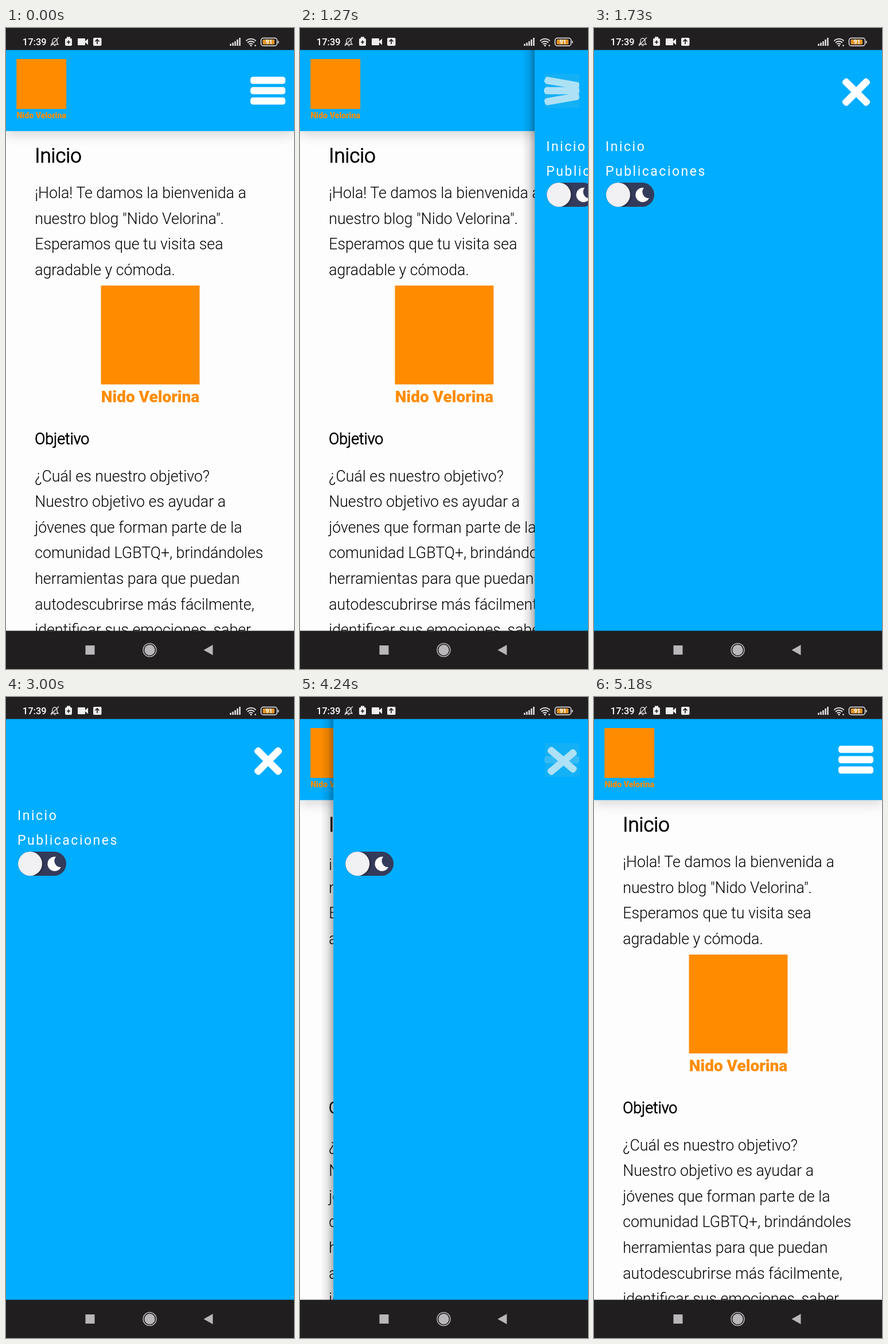
These frames come from a looping animation (502 px wide and 1115 px high, 5.24 s). An HTML page:

```html
<!DOCTYPE html>
<html lang="es">
<head>
<meta charset="utf-8">
<title>Menú móvil</title>
<style>
  html, body { margin: 0; height: 100%; overflow: hidden; background: #fefdfe; }
  svg { display: block; width: 100vw; height: 100vh; font-family: Roboto, sans-serif; }
  #copy text { font-size: 26.74px; font-weight: 300; }
  #copy .title { stroke: #000; stroke-width: .034em; }
  #links { font-size: 23px; letter-spacing: 2.5px; fill: #fff; }
</style>
</head>
<body>
<svg viewBox="0 0 502 1115">
  <defs>
    <linearGradient id="beside" x1="1" x2="0">
      <stop stop-opacity=".3"/><stop offset=".45" stop-opacity=".1"/><stop offset="1" stop-opacity="0"/>
    </linearGradient>
    <filter id="soft" x="-30%" y="-30%" width="160%" height="160%"><feGaussianBlur stdDeviation="2"/></filter>
    <filter id="wide" x="-10%" y="-30%" width="120%" height="160%"><feGaussianBlur stdDeviation="10"/></filter>
    <clipPath id="pill"><rect x="21" y="269" width="84" height="42" rx="21"/></clipPath>
    <g id="logo" fill="#ff8c00">
      <rect x="2.5" width="172" height="172"/>
      <text x="88.5" y="203" font-size="28" font-weight="900" text-anchor="middle">Nido Velorina</text>
    </g>
  </defs>

  <rect width="502" height="1115" fill="#fefdfe"/>
  <g id="copy">
    <text class="title" x="50.2" y="234" style="font-size:34.8px">Inicio</text>
    <text class="title" x="50.2" y="724">Objetivo</text>
  </g>
  <use href="#logo" transform="translate(163 448)"/>

  <rect y="46" width="502" height="141" opacity=".14" filter="url(#wide)"/>
  <rect y="38" width="502" height="141.300" fill="#00adff"/>
  <use href="#logo" transform="translate(17 54) scale(.505)"/>

  <g id="panel">
    <rect x="-22" y="38" width="22" height="1011" fill="url(#beside)"/>
    <rect y="38" width="530" height="1011" fill="#00adff"/>
    <g id="links">
      <text x="20" y="213.5">Inicio</text>
      <text x="20" y="256.5">Publicaciones</text>
    </g>
    <rect x="21" y="269" width="84" height="42" rx="21" fill="#343b5b"/>
    <circle cx="43" cy="291" r="21" opacity=".5" filter="url(#soft)" clip-path="url(#pill)"/>
    <circle cx="42" cy="290" r="21" fill="#f1f0f2"/>
    <path d="M87 278A12.5 12.5 0 1 0 96 296A11 11 0 0 1 87 278Z" fill="#fff"/>
  </g>

  <g id="bars" fill="#fff">
    <rect x="-30.5" y="-6.2" width="61" height="12.4" rx="4.5"/>
    <rect x="-30.5" y="-6.2" width="61" height="12.4" rx="4.5" transform="translate(456.5 109)"/>
    <rect x="-30.5" y="-6.2" width="61" height="12.4" rx="4.5"/>
  </g>
  <rect id="tap" x="427" y="80" width="60" height="59" fill="#33b5e5"/>

  <rect width="502" height="38.300" fill="#221f21"/>
  <text x="28.8" y="30" font-size="16.5" font-weight="500" fill="#fff">17:39</text>
  <g fill="#eee">
    <path d="M79 28.500H91L89 25.500V22A4 4 0 0 0 81 22V25.500ZM83.500 30.500H86.500M78 31L92 16.500" fill="none" stroke="#ddd" stroke-width="1.4"/>
    <path d="M106 15.500H112V18H106Z"/>
    <rect x="103" y="18" width="12" height="13" rx="2"/>
    <rect x="125" y="18" width="13" height="12" rx="1"/>
    <path d="M137 24L143 18.500V29.500Z"/>
    <rect x="152" y="17" width="14.500" height="14" rx="2"/>
    <path d="M106 24.500H112M109 21.500V27.500M159 28V20.500M155.500 23.500L159 20L162.500 23.500" fill="none" stroke="#221f21" stroke-width="1.7"/>
    <path d="M391.500 31V27.500M395.500 31V25.500M399.500 31V23M403.500 31V20M407.500 31V17" stroke="#eee" stroke-width="2.4"/>
    <path d="M418.500 22.500A12 12 0 0 1 435.500 22.500M421 25.500A8.500 8.500 0 0 1 433 25.500M423.500 28.300A5 5 0 0 1 430 28.300" fill="none" stroke="#eee" stroke-width="1.8"/>
    <circle cx="427" cy="30.500" r="1.500"/>
    <circle cx="434.500" cy="30.500" r="1.300"/>
    <rect x="444.500" y="17.500" width="28" height="13.500" rx="4" fill="none" stroke="#eee" stroke-width="1.500"/>
    <rect x="447.500" y="20" width="20.500" height="8.500" rx="1.500" fill="#e09527"/>
    <rect x="474" y="22.500" width="1.500" height="4"/>
    <text x="458.500" y="28" font-size="10" font-weight="700" text-anchor="middle" fill="#fff">91</text>
  </g>

  <rect y="1048.500" width="502" height="66.500" fill="#211e20"/>
  <g fill="#b9b7b9">
    <rect x="138.500" y="1074" width="16" height="16"/>
    <circle cx="250.500" cy="1082" r="9.200"/>
    <circle cx="250.500" cy="1082" r="11.500" fill="none" stroke="#b9b7b9" stroke-width="1.500"/>
    <path d="M344.500 1082L360.500 1073V1091Z"/>
  </g>
</svg>
<script>
const LOOP = 5240, OPEN = 1221, CLOSE = 4208, SLIDE = 300, TRAVEL = 525;
const $ = id => document.getElementById(id);
const clamp = v => Math.min(1, Math.max(0, v));
const lerp = (a, b, k) => a + (b - a) * k;

function addLines(y, lines) {
  lines.forEach((line, i) => {
    const text = document.createElementNS('http://www.w3.org/2000/svg', 'text');
    text.setAttribute('x', 50.2);
    text.setAttribute('y', y + i * 44.6);
    text.textContent = line;
    $('copy').append(text);
  });
}
addLines(296, ['¡Hola! Te damos la bienvenida a', 'nuestro blog "Nido Velorina".',
  'Esperamos que tu visita sea', 'agradable y cómoda.']);
addLines(788.5, ['¿Cuál es nuestro objetivo?', 'Nuestro objetivo es ayudar a',
  'jóvenes que forman parte de la', 'comunidad LGBTQ+, brindándoles',
  'herramientas para que puedan', 'autodescubrirse más fácilmente,',
  'identificar sus emociones, saber']);

// CSS "ease": cubic-bezier(.25, .1, .25, 1)
function ease(x) {
  if (x <= 0 || x >= 1) return clamp(x);
  const curve = (a, b, s) => 3 * a * s * (1 - s) ** 2 + 3 * b * s * s * (1 - s) + s ** 3;
  let lo = 0, hi = 1;
  for (let i = 0; i < 24; i++) {
    const mid = (lo + hi) / 2;
    if (curve(.25, .25, mid) < x) lo = mid; else hi = mid;
  }
  return curve(.1, 1, lo);
}

// touch highlight: appears just before the slide, then fades
const touch = dt => dt < -90 ? 0 : clamp((130 - dt) / 70);

function draw(now) {
  const t = now % LOOP;
  const open = ease((t - OPEN) / SLIDE) - ease((t - CLOSE) / SLIDE);
  $('panel').setAttribute('transform', `translate(${TRAVEL * (1 - open)} 0)`);
  $('links').style.visibility = t < CLOSE ? 'visible' : 'hidden';

  const [top, middle, bottom] = $('bars').children;
  const pose = (bar, y, angle) => bar.setAttribute('transform',
    `translate(${lerp(456.5, 457, open)} ${lerp(y, 111.5, open)}) rotate(${angle * open})`);
  pose(top, 91, 45);
  pose(bottom, 127, -45);
  middle.setAttribute('opacity', clamp(2 * (1 - open)));
  $('tap').setAttribute('opacity', .4 * touch(t - (t < 2600 ? OPEN : CLOSE)));
  requestAnimationFrame(draw);
}
requestAnimationFrame(draw);
</script>
</body>
</html>
```
